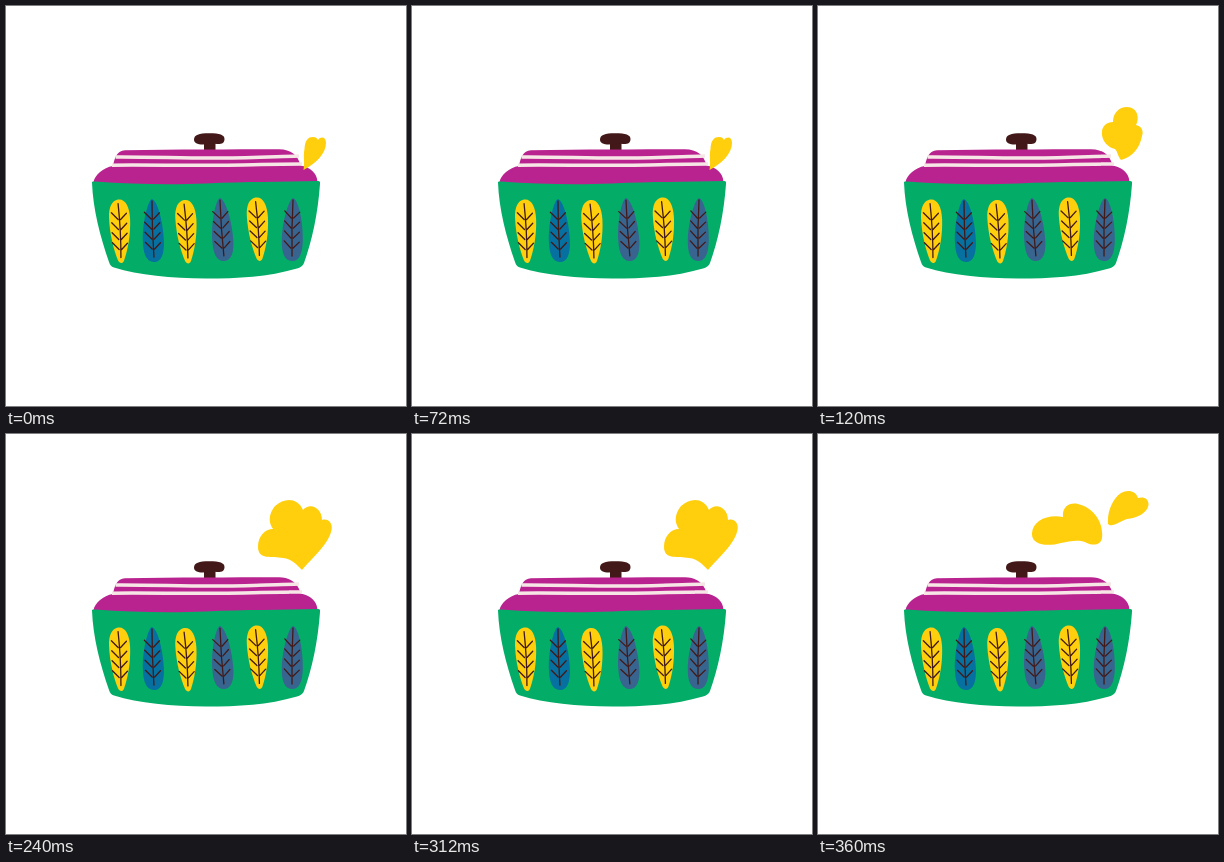
Write an HTML page that moves like this. It is 400 px wide and 400 px high and loops after 480 ms.

```html
<!DOCTYPE html>
<html lang="en">
<head>
<meta charset="utf-8">
<title>Steaming pot</title>
<style>
  html, body { margin: 0; width: 100%; height: 100%; overflow: hidden; background: #fff; }
  svg { display: block; width: 100%; height: 100%; }
</style>
</head>
<body>
<svg viewBox="0 0 400 400">
  <g fill="#421918">
    <path d="M198 137H209.500V146H198Z"/>
    <path d="M188 133.500C188 129 193 127.300 203 127.300C214 127.300 218.500 129 218.500 133C218.500 137 216 138.200 211 138C205 137.500 202 138 197 138.500C191 138.500 188 137 188 133.500Z"/>
  </g>
  <path fill="#b9238f" d="M87.500 180V176C89 169 97 161.500 107 160C108.500 152 111 144.500 119 144.200C170 143 225 143.500 273 143.200C285 143.500 292 149 294.500 159.500C304 161 311 167 311.500 176V180Z"/>
  <g fill="none" stroke="#f7e6e6" stroke-width="3.500">
    <path d="M109.500 151C150 150.800 175 152.300 215 152C245 151.800 265 150.800 293 150"/>
    <path d="M106 159.200C150 158.800 175 159.800 215 159.200C245 158.800 270 158 296 158"/>
  </g>
  <path fill="#03ad67" d="M86 176.500C86 175.500 87 175.300 89 175.500C125 178 160 179 200 177.500C240 175.500 275 176 312 175C314 175 314.300 176 314 178C312 207 306 235 298 257C297 260 294 261.500 291 262.500C262 271 232 272.500 200 272.500C165 272.500 133 269 108 261.500C105 260.500 104 259 103 256C94 230 87 203 86 176.500Z"/>
  <g id="leaves"></g>
  <path id="steam" fill="#ffcf0d"/>
</svg>
<script>
  const YELLOW = "#ffcf0d", BLUE = "#0670a0", SLATE = "#386590";

  // Leaf outlines and veins, relative to the top centre of each leaf.
  const wideTop = "M-1 0C6 -1 10.500 7 10.500 20C10.500 36 7 51 3 61C1.500 64.500 -1.500 64 -3 61C-7 50 -10.500 34 -10.500 18C-10.500 7 -7 1 -1 0Z";
  const wideBottom = "M0 0C5 1 10.500 22 10.500 42C10.500 55 7.500 63 0 63C-7.500 63 -10.500 55 -10.500 43C-10.500 23 -4 1 0 0Z";
  const barbs = [14, 24, 34, 44].map(y =>
    `M-8 ${y - 1}L-1.500 ${y + 6}M7 ${y}L1 ${y + 6}`
  ).join("");

  const leaf = (x, y, color, tilt) => {
    const yellow = color === YELLOW;
    const stem = yellow ? "M-1 4Q1 32 0 58" : "M0 2Q-1 30 0 58";
    return `<g transform="translate(${x} ${y}) rotate(${tilt} 0 31)">
      <path d="${yellow ? wideTop : wideBottom}" fill="${color}"/>
      <path d="${stem}${barbs}" fill="none" stroke="#421918" stroke-width="1.300" stroke-linecap="round"/>
    </g>`;
  };

  document.getElementById("leaves").innerHTML = [
    leaf(114, 193.500, YELLOW, -2),
    leaf(147, 193, BLUE, -2),
    leaf(180.500, 194, YELLOW, -3),
    leaf(216, 192, SLATE, -4),
    leaf(252, 191.500, YELLOW, -3),
    leaf(286.500, 192, SLATE, 1)
  ].join("");

  const POSE_MS = 120;
  const puffs = [
    "M297.500 164C299 156 297 150 298.500 143C299 134 302 131 307 131C310 131 311 132 312 134C315 130 320 131 320 137C320 148 309 158 297.500 164Z",
    "M303 154C299 149 300 146 297 143C290 142 283 134 284 126C284 120 289 116 295 116C295 107 301 101 309 101C319 101 322 111 318 119C323 120 326 124 324 130C322 141 315 151 303 154Z",
    "M296 136C290 130 286 125 277 124C266 122 252 126 252 113C252 102 259 95 267 95C261 87 264 78 269 72C279 63 292 64 297 76C304 68 316 74 316 86C322 84 327 89 325.500 96C323 110 306 124 296 136Z",
    "M214 99C215 87 229 80 245 83C244 73 251 68 260 70C274 73 286 87 284 104C283 111 275 112 269 109C262 105 252 107 243 109C229 113 213 111 214 99Z" +
    "M290 90C289 79 294 65 303 59C310 55 318 57 320 64C326 62 331 65 330.500 71C329 80 318 84 309 85C302 87 294 94 290 90Z"
  ];
  const steam = document.getElementById("steam");

  function draw(now) {
    steam.setAttribute("d", puffs[Math.floor(now / POSE_MS) % puffs.length]);
    requestAnimationFrame(draw);
  }
  draw(0);
</script>
</body>
</html>
```
